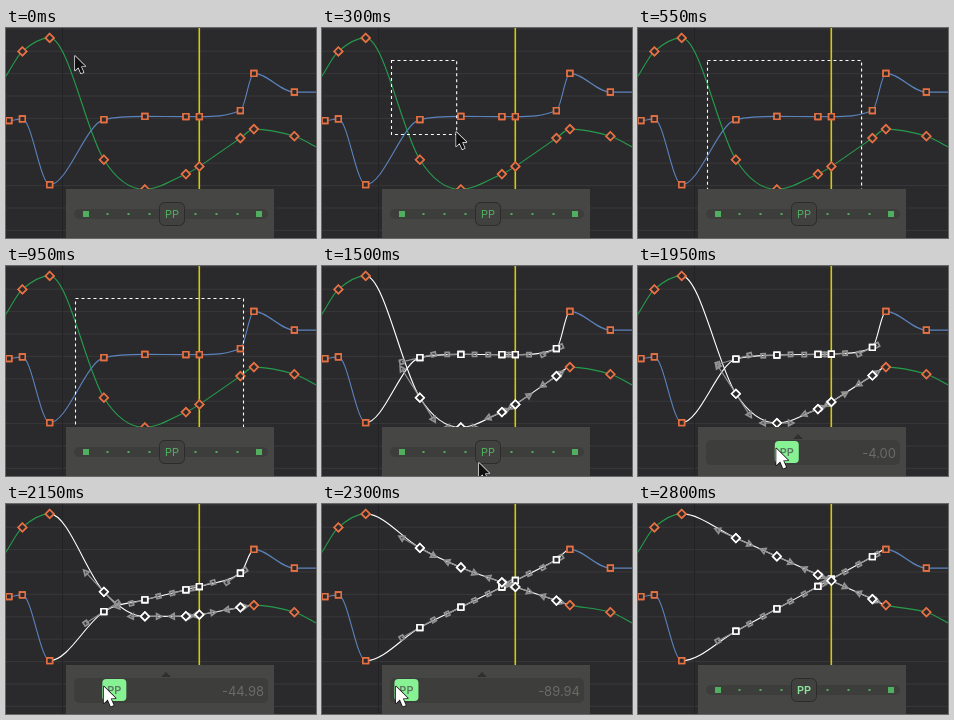
An HTML page with a canvas for the animation above (3000 ms loop, 310x210 px).

```html
<!DOCTYPE html>
<html lang="en">
<head>
<meta charset="utf-8">
<title>Curve editor: push and pull keys</title>
<style>
html, body { margin: 0; width: 100%; height: 100%; overflow: hidden; background: #2a2a2c; }
canvas { display: block; }
</style>
</head>
<body>
<canvas id="stage" width="310" height="210"></canvas>
<script>
const ctx = document.getElementById('stage').getContext('2d');
const LOOP = 3000, STEP = 50;
const SELECT = 1100, APPEAR = 1500, PRESS = 1700, RELEASE = 2700;
const FONT = 'Inter, "Open Sans", sans-serif';
const ORANGE = '#e57043', HANDLE = '#929292';

const blue = {
  color: '#5b83bd', square: true,
  keys: [[-25, 92.2], [2.5, 92.2], [16, 90.5], [43.3, 156.3], [97.5, 91.2], [138.5, 88],
    [179.5, 88.2], [193, 88.2], [234, 82.2], [247.5, 45], [288, 63.7], [329, 63.7]]
};
const green = {
  color: '#259c4c', square: false,
  keys: [[-11.3, 57.5], [16, 23], [43.3, 9.5], [97.5, 131.3], [138.5, 161], [179.5, 145.7],
    [193, 138], [234, 109.7], [247.5, 100.7], [288, 107.8], [329, 125]]
};

const clamp = (v, lo = 0, hi = 1) => Math.min(hi, Math.max(lo, v));
const span = (t, a, b) => clamp((t - a) / (b - a));
const smooth = u => u * u * (3 - 2 * u);
const mix = (a, b, u) => a + (b - a) * u;
const isSelected = x => x > 90 && x < 240;

function line(points, color, width = 1, close = false) {
  ctx.beginPath();
  points.forEach(([x, y]) => ctx.lineTo(x, y));
  if (close) ctx.closePath();
  ctx.strokeStyle = color;
  ctx.lineWidth = width;
  ctx.stroke();
}

function box(x, y, w, h, r, fill, stroke) {
  ctx.beginPath();
  ctx.roundRect(x, y, w, h, r);
  ctx.fillStyle = fill;
  ctx.fill();
  if (stroke) {
    ctx.strokeStyle = stroke;
    ctx.lineWidth = 1;
    ctx.stroke();
  }
}

function text(str, x, y, font, color, align) {
  ctx.font = `${font} ${FONT}`;
  ctx.textAlign = align;
  ctx.fillStyle = color;
  ctx.fillText(str, x, y);
}

// Pulls the selected keys towards the straight line between their fixed neighbours.
function pull(keys, amount) {
  const [x0, y0] = keys.findLast(k => k[0] < 90);
  const [x1, y1] = keys.find(k => k[0] > 240);
  return keys.map(([x, y]) => isSelected(x)
    ? [x, mix(y, mix(y0, y1, (x - x0) / (x1 - x0)), amount)] : [x, y]);
}

// Auto tangent: flat at extremes, never overshooting a neighbour.
function slope(keys, i) {
  const a = keys[i - 1], b = keys[i], c = keys[i + 1];
  if (!a || !c) return 0;
  const left = (b[1] - a[1]) / (b[0] - a[0]);
  const right = (c[1] - b[1]) / (c[0] - b[0]);
  if (left * right <= 0) return 0;
  const mean = (c[1] - a[1]) / (c[0] - a[0]);
  return Math.sign(mean) * Math.min(Math.abs(mean), 3 * Math.abs(left), 3 * Math.abs(right));
}

function marker(x, y, square, color) {
  const r = square ? 2.8 : 4.2;
  const shape = square
    ? [[x - r, y - r], [x + r, y - r], [x + r, y + r], [x - r, y + r]]
    : [[x, y - r], [x + r, y], [x, y + r], [x - r, y]];
  line(shape, color, 1.6, true);
  ctx.fillStyle = '#2c2a2b';
  ctx.fill();
  line(shape, color, 1.6, true);
}

function handle(from, to, square) {
  line([from, to], HANDLE, 1.2);
  ctx.save();
  ctx.translate(...to);
  ctx.rotate(Math.atan2(to[1] - from[1], to[0] - from[0]));
  const shape = square
    ? [[-2.1, -2.1], [2.1, -2.1], [2.1, 2.1], [-2.1, 2.1]]
    : [[3.2, 0], [-2, -2.8], [-2, 2.8]];
  line(shape, HANDLE, 1.7, true);
  ctx.restore();
}

// Draws the line and returns a function that draws its keys on top.
function drawCurve({ color, square, keys: rest }, amount, selected) {
  const keys = pull(rest, amount);
  const slopes = keys.map((k, i) => slope(keys, i));
  const tip = (i, dx) => [keys[i][0] + dx, keys[i][1] + slopes[i] * dx];
  const third = i => (keys[i + 1][0] - keys[i][0]) / 3;

  for (let i = 0; i < keys.length - 1; i++) {
    const lit = selected && (isSelected(keys[i][0]) || isSelected(keys[i + 1][0]));
    ctx.beginPath();
    ctx.moveTo(...keys[i]);
    ctx.bezierCurveTo(...tip(i, third(i)), ...tip(i + 1, -third(i)), ...keys[i + 1]);
    ctx.strokeStyle = lit ? '#fff' : color;
    ctx.lineWidth = 1.1;
    ctx.stroke();
  }
  return () => {
    if (selected) keys.forEach((k, i) => {
      if (!isSelected(k[0])) return;
      handle(k, tip(i, -third(i - 1)), square);
      handle(k, tip(i, third(i)), square);
    });
    keys.forEach(([x, y]) => marker(x, y, square, selected && isSelected(x) ? '#fff' : ORANGE));
  };
}

function drawGrid() {
  ctx.fillStyle = '#2a2a2c';
  ctx.fillRect(0, 0, 310, 210);
  for (let y = 0.8; y < 210; y += 22.4) line([[0, y], [310, y]], '#38383a');
  line([[56.5, 0], [56.5, 210]], '#232325');
}

function cursor(x, y, dragging) {
  ctx.save();
  ctx.translate(x, y);
  if (dragging) ctx.scale(1.15, 1.15);
  ctx.lineJoin = 'round';
  const shape = [[0, 0], [0, 14.5], [3.4, 11.4], [6, 17.4], [8.6, 16.3], [6, 10.4], [10.3, 10.2]];
  line(shape, dragging ? '#111' : '#fff', 1.3, true);
  ctx.fillStyle = dragging ? '#fff' : '#111';
  ctx.fill();
  ctx.restore();
}

function drawMarquee(t) {
  const u = 1 - (1 - span(t, 100, 650) ** 1.8) ** 3;
  const right = 69.5 + 158.5 * u + 9.5 * span(t, 650, 950);
  const bottom = 32.5 + 180 * u;
  if (t >= 150) {
    ctx.setLineDash([3, 3]);
    line([[69.5, 32.5], [right, 32.5], [right, bottom], [69.5, bottom]], '#fff', 1.1, true);
    ctx.setLineDash([]);
  }
  cursor(right - 0.5, bottom - 4.5 * (1 - u), false);
}

function drawPanel(t, shift, amount) {
  const dragging = t >= PRESS && t < RELEASE;
  const x = dragging ? 166 - shift : 166;
  ctx.fillStyle = '#464644';
  ctx.fillRect(60, 161, 208, 49);
  if (dragging) {
    box(68, 174, 194, 25, 5, '#3d3d3b');
    ctx.beginPath();
    [[155, 173], [160, 168], [165, 173]].forEach(p => ctx.lineTo(...p));
    ctx.fillStyle = '#2f2f2e';
    ctx.fill();
    text((-100 * amount).toFixed(2), 258, 192, '13px', '#6a6a68', 'right');
    box(x - 12, 175, 24, 22, 4, '#86f294');
    text('PP', x, 190, '600 11px', '#5c7a61', 'center');
    return;
  }
  box(68, 181, 194, 10, 5, '#3d3d3b');
  ctx.fillStyle = '#50ae5f';
  for (const side of [-1, 1]) {
    ctx.fillRect(166.5 + side * 86.5 - 3, 183, 6, 6);
    for (let i = 1; i < 4; i++) ctx.fillRect(166.5 + side * (2 + i * 21) - 1, 185, 2, 2);
  }
  box(153.5, 174.5, 25, 23, 5, '#41413f', '#2b2c2b');
  const hover = t >= RELEASE || (t >= 1600 && t < PRESS);
  text('PP', 166, 189.5, hover ? '600 11px' : '11px', hover ? '#8be39a' : '#50ae5f', 'center');
}

function draw(t) {
  const shift = 86 * smooth(span(t, 1775.2, 2383.8));
  const amount = (shift / 86) ** 2;
  const selected = t >= SELECT;

  drawGrid();
  ctx.save();
  ctx.translate(0.4, 0.4);
  const marks = [blue, green].map(c => drawCurve(c, amount, selected));
  line([[192.9, -1], [192.9, 210]], '#d6c90c', 1.6);
  marks.forEach(mark => mark());
  ctx.restore();
  if (!selected) drawMarquee(t);
  drawPanel(t, shift, amount);

  if (t >= APPEAR && t < 2800) {
    const come = smooth(span(t, APPEAR, 1650));
    const leave = span(t, 2650, 2800);
    cursor(157 - 1.5 * come - shift, 197 - 14.5 * come + 30 * leave, t >= PRESS && t < RELEASE);
  }
}

const start = performance.now();
function tick(now) {
  const t = Math.max(0, now - start) % LOOP;
  draw(Math.floor(t / STEP) * STEP);
  requestAnimationFrame(tick);
}
tick(start);
</script>
</body>
</html>
```
